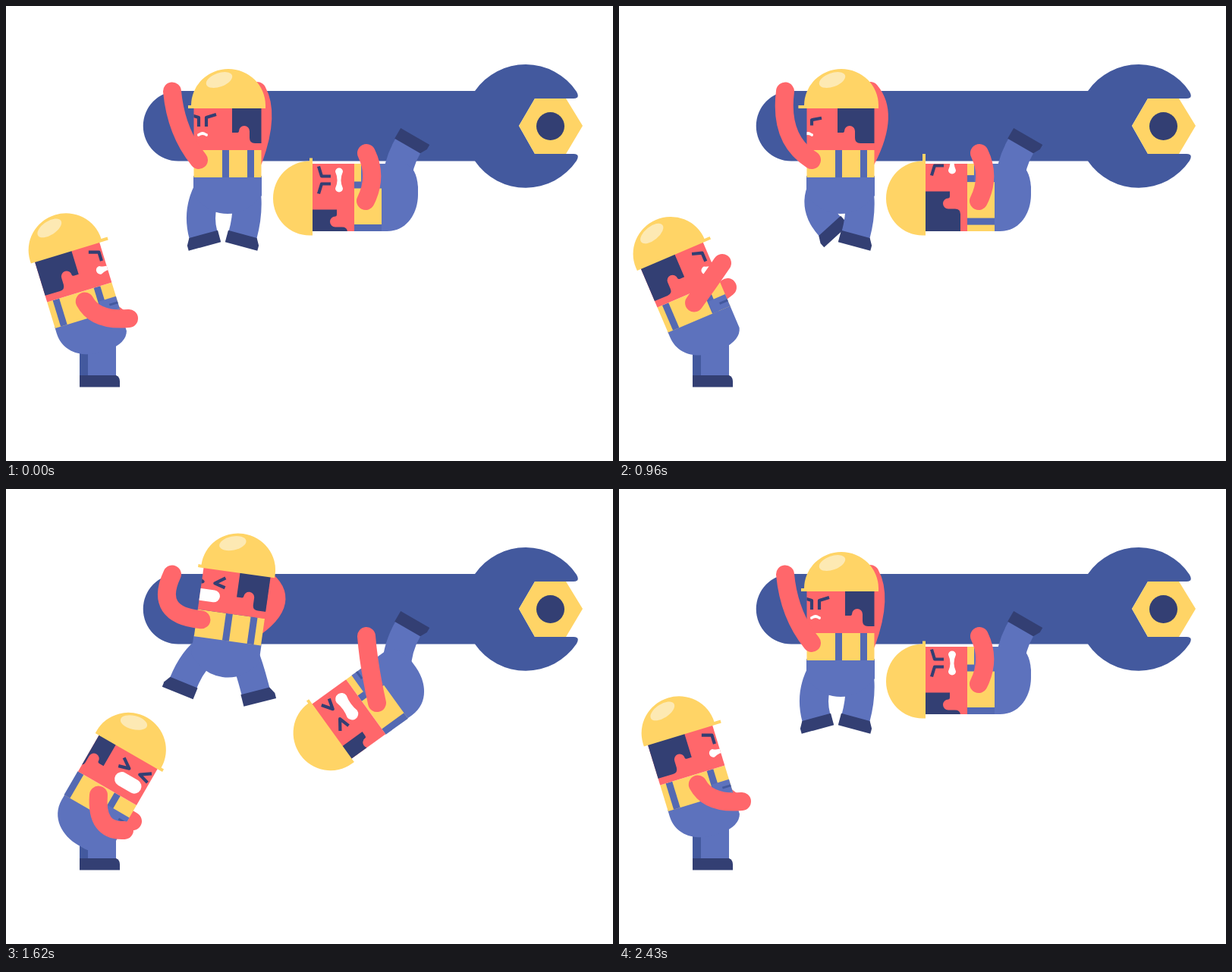
An HTML page for the animation above (2.7 s loop, 800 by 600 pixels).

```html
<!DOCTYPE html>
<html lang="en">
<head>
<meta charset="utf-8">
<title>Workers and wrench</title>
<style>
html, body { margin: 0; width: 100%; height: 100%; overflow: hidden; background: #fff; }
svg { display: block; width: 100vw; height: 100vh; }
</style>
</head>
<body>
<svg viewBox="0 0 800 600">
  <defs><clipPath id="face"><rect x="-44.5" y="-91" width="89" height="56"/></clipPath></defs>
  <path fill="#43599e" d="M227 112H618A81 81 0 0 1 752 113Q757 122 748 122H697L676 158L697 195H748Q757 195 752 204A81 81 0 0 1 618 204.5H227A46 46 0 0 1 227 112Z"/>
  <path fill="#ffd466" d="M697 122H738L760 158L738 195H697L676 158Z"/>
  <circle cx="717.5" cy="158.5" r="18.5" fill="#333f73"/>
  <g id="crew"></g>
</svg>
<script>
const LOOP = 2700, STEP = 30, LAST = 2430;
const SKIN = '#ff676b', YELLOW = '#ffd466', BLUE = '#5d72bd', STRAP = '#5469b2', DEEP = '#43599e', NAVY = '#333f73';

// Motion helpers
const mix = (a, b, k) => a + (b - a) * k;
const blend = (a, b, k) => a.map((v, i) => mix(v, b[i], k));
const part = (t, a, b) => Math.min(1, Math.max(0, (t - a) / (b - a)));
const ease = (t, a, b) => { const u = part(t, a, b); return u * u * (3 - 2 * u); };
const easeOut = (t, a, b) => Math.sin(part(t, a, b) * Math.PI / 2);
const pulse = (t, a, b, c, d) => ease(t, a, b) - ease(t, c, d);
const rad = deg => deg * Math.PI / 180;

// Drawing helpers
const shape = (d, fill) => `<path d="${d}" fill="${fill}"/>`;
const box = (x, y, w, h, fill) => `<rect x="${x}" y="${y}" width="${w}" height="${h}" fill="${fill}"/>`;
const line = (d, color, w, cap) => `<path d="${d}" fill="none" stroke="${color}" stroke-width="${w}" stroke-linecap="${cap}" stroke-linejoin="round"/>`;
const arm = (a, c, b) => line(`M${a}Q${c} ${b}`, SKIN, 24, 'round');
const place = (p, flip, body) => `<g transform="translate(${p.x} ${p.y}) rotate(${p.tilt}) scale(${flip} 1)">${body}</g>`;

// Stage position of a point on a worker's body
function spot(p, x, y, flip = 1) {
  const s = Math.sin(rad(p.tilt)), c = Math.cos(rad(p.tilt));
  x *= flip;
  return [p.x + x * c - y * s, p.y + x * s + y * c];
}

function leg(hip, [x, y], turn, toe) {
  const knee = [x + 34 * Math.sin(rad(turn)), y - 34 * Math.cos(rad(turn))];
  return line(`M${hip}Q${knee} ${x},${y}`, BLUE, 38, 'butt') +
    `<g transform="translate(${x} ${y}) rotate(${turn}) scale(${toe} 1)">${shape('M-20 -1H19L24 8V15H-20Z', NAVY)}</g>`;
}

// An eye bends from an angry corner into a tight wedge
function eye(x, p) {
  const angry = [[-13, -82], [0, -78], [0, -66]], tight = [[-16, -81], [-3, -72], [-17, -68]];
  const side = x > 30 ? -1 : 1;
  const pts = angry.map((a, i) => {
    const [ex, ey] = blend(a, tight[i], p.grit);
    return [x + p.turn + ex * side, mix(ey, -70, p.shut || 0)];
  });
  return line('M' + pts.join('L'), NAVY, 4.2, 'butt');
}

function mouth([a, h, waist, bend]) {
  return shape(`M${-a} ${-h}Q0 ${bend - h * waist} ${a} ${-h}A${h} ${h} 0 0 1 ${a} ${h}` +
    `Q0 ${bend + h * waist} ${-a} ${h}A${h} ${h} 0 0 1 ${-a} ${-h}Z`, '#fff');
}

function head(p, shine) {
  const e = p.turn - 6, brim = 52 + Math.max(0, p.turn - 2) * .45;
  const hair = `M-45 -91H${e}V-58H${e - 6}Q${e - 9} -58 ${e - 9} -60A7 7 0 0 0 ${e - 23} -60V-51Q${e - 23} -44 ${e - 30} -44H-45Z`;
  return box(-44.5, -91, 89, 56, SKIN) +
    `<g clip-path="url(#face)">${shape(hair, NAVY)}${eye(28, p)}${eye(38, p)}` +
    `<g transform="translate(${33 + p.turn} -55)">${mouth(p.mouth)}</g></g>` +
    shape(`M-50 -90V-94A49 48 0 0 1 48 -94H${brim}V-90Z`, YELLOW) +
    (shine ? `<ellipse transform="translate(${shine} -127.5) rotate(${shine > 0 ? 20 : -16})" rx="18" ry="9" fill="#fde9b3"/>` : '');
}

function torso(back, front, bib) {
  const strap = x => box(Math.max(-45, x), -35, 9, 36, STRAP);
  return box(-44.5, -35, 89, 36, YELLOW) + strap(back) + strap(front) +
    (bib ? box(front + 1, -bib, 43.5 - front, bib + 1, BLUE) + box(33, -bib + 7, 11.5, 3, DEEP) : '');
}

// Straps slide round the body as the worker turns
const bibTorso = (p, bib) => torso(-41 + .35 * p.turn, 15.5 + .35 * p.turn, bib);

const seat = 'M-44.5 -1V8C-44.5 35 -20 49 4 49H14Q40 47 44.5 32V-1Z';
const hips = 'M-45 -1H45V25Q26 49 0 49Q-26 49 -45 25Z';

// Pulls himself up twice, kicking his legs
function drawHanger(t) {
  const hop = pulse(t, 0, 300, 330, 900);
  const pull = easeOut(t, 960, 1890) - ease(t, 1950, 2430);
  const look = pulse(t, 540, 960, 960, 1350);
  const grit = pulse(t, 1020, 1320, 2040, 2400);
  const shut = .9 * pulse(t, 90, 390, 450, 960) + .4 * look;
  const p = {
    x: 292, y: 225 - 23 * hop - 28.5 * pull, tilt: 8 * pulse(t, 960, 1500, 1920, 2400),
    turn: 10 * look + 2 * grit, grit, shut,
    mouth: blend([5 - 5 * hop, 2, 1, 4 * hop - 4], [9, 8, 1, 0], grit)
  };
  const kick = .9 * pulse(t, 0, 390, 450, 900) + pulse(t, 960, 1320, 1380, 1890) + .8 * pulse(t, 1920, 2190, 2190, 2430);
  const limb = (side, s) => {
    const hip = spot(p, -24 * side, 15, -1), out = 2 + 45 * s;
    return leg(hip, [hip[0] - 6 + side * out, hip[1] + 62 - 40 * Math.abs(s) ** 1.4], side * (15 - 68 * s), side);
  };
  const flex = Math.min(1, hop + pull * 1.5);
  return arm([331, 112], [mix(348, 383, flex) + 9 * look, 143], spot(p, -34, -22, -1)) +
    limb(-1, kick - .4 * look) +
    limb(1, kick - .5 * pulse(t, 1500, 1890, 1890, 2190)) +
    place(p, -1, shape(hips, BLUE) + torso(-35, -2, 0) + head(p, 11)) +
    arm([219, 112.5], [mix(224, 194, flex) - 13 * look, 166 + 10 * look], spot(p, 38, -22, -1));
}

// Swings down from the wrench by hand and foot
function drawClimber(t) {
  const drop = pulse(t, 960, 1890, 2070, 2430);
  const swing = 18.5 * pulse(t, 0, 390, 420, 930) + 45 * drop;
  const grit = pulse(t, 1020, 1320, 2040, 2400);
  const p = {
    x: 494 + .24 * swing, y: 252.5 + 15 * Math.sin(rad(2 * swing)), tilt: -90 - swing,
    turn: -10 + 24 * pulse(t, 450, 960, 960, 1320) - 10 * drop, grit,
    mouth: blend([11, 5, 0, 0], [12, 8, .6, 0], grit)
  };
  const flex = Math.min(1, swing / 18);
  return leg(spot(p, 10, 22), [530, 184], 210, -1) +
    place(p, 1, shape(seat, BLUE) + bibTorso(p, 26) + head(p, 0)) +
    arm([475, 194], [490 - 12 * flex, 225 + 8 * flex], spot(p, -4.5, -20));
}

// Sways back, raises his hands, then doubles over
function drawStander(t) {
  const lean = pulse(t, 540, 780, 780, 1200);
  const raise = pulse(t, 540, 900, 990, 1290);
  const fold = pulse(t, 1020, 1530, 1890, 2160);
  const grit = pulse(t, 1020, 1320, 1890, 2130);
  const p = {
    x: 107 + 9 * fold - 3 * lean, y: 411 + 14 * Math.sin(fold * Math.PI / 2) + 2 * lean,
    tilt: -17 + 47 * fold - 10 * lean, turn: 12 - 25 * fold - 2 * raise, grit,
    mouth: blend([10, 5.5, 0, 0], [9.5, 9.5, 1, 0], grit)
  };
  const reach = (rest, up, down) => blend(blend(rest, up, raise), down, fold);
  const far = reach([150, 412], [143, 371], [167, 438]);
  return line(`M${spot(p, 20, -15)}L${far}`, SKIN, 24, 'round') +
    box(97, 455, 12, 34, DEEP) + box(108, 445, 37, 43, BLUE) +
    shape('M97 487H145Q150 489 150 495V502.5H97Z', NAVY) +
    place(p, 1, shape(seat, BLUE) + bibTorso(p, 16) + head(p, -13)) +
    arm(spot(p, .35 * p.turn - 1, -21.5), reach([118, 416], [119, 364], [118, 452]), reach([162, 412], [136, 339], [156, 450]));
}

const crew = document.getElementById('crew');
const start = performance.now();
let shown = -1;
function frame() {
  const t = Math.min(LAST, Math.floor((performance.now() - start) % LOOP / STEP) * STEP);
  if (t !== shown) {
    shown = t;
    crew.innerHTML = drawHanger(t) + drawClimber(t) + drawStander(t);
  }
  requestAnimationFrame(frame);
}
frame();
</script>
</body>
</html>
```
